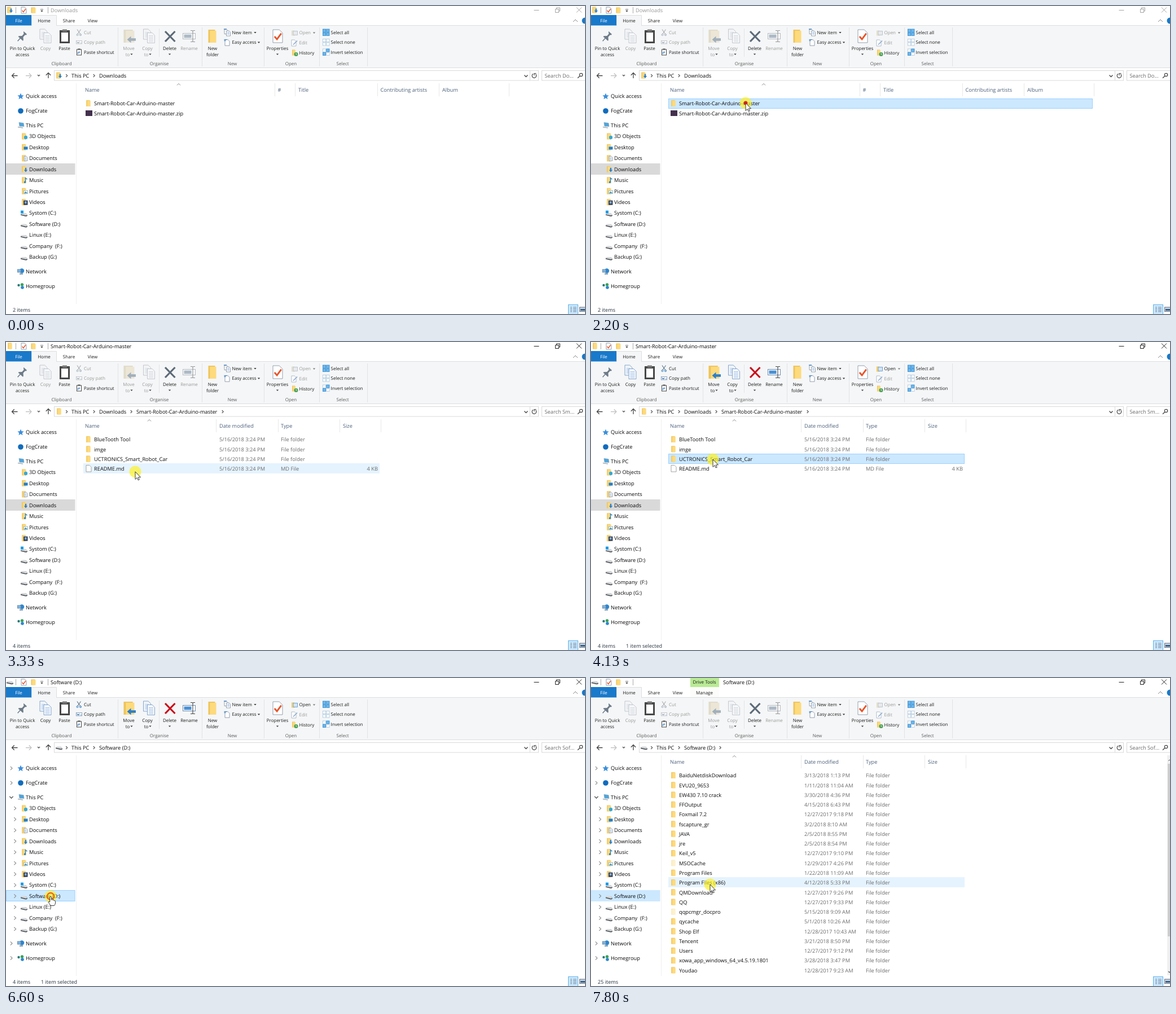
These frames come from a looping animation (1026 by 546 pixels, 8000 ms). An HTML page:

```html
<!DOCTYPE html>
<html lang="en">
<head>
<meta charset="utf-8">
<title>File manager</title>
<style>
  html, body { margin: 0; width: 100%; height: 100%; overflow: hidden; background: #fff; }
  svg { display: block; width: 1026px; height: 546px; }
  text { font: 9.28px "Open Sans", "Noto Sans", sans-serif; fill: #0c0c0c; white-space: pre; text-rendering: geometricPrecision; }
  .s { font-size: 8px; fill: #1c1c1c; }
  .m { text-anchor: middle; }
  .e { text-anchor: end; }
  .group { fill: #5c5c5c; }
  .head { font-size: 9.2px; fill: #4c607a; }
  .dim { fill: #6a6a6a; }
  .status { font-size: 9.1px; fill: #26323f; }
  .gray { fill: #9a9a9a; }
  .white { fill: #fff; }
  .off .lbl { fill: #9a9a9a; }
  .off .ic { filter: grayscale(.7); opacity: .55; }
  .cross { stroke: #c8101c; }
  .off .cross { stroke: #5c6977; }
  .ctl { stroke: #222; }
  .idle .ctl { stroke: #a5a5a5; }
  .idle .title { fill: #999; }
</style>
</head>
<body>
<svg id="stage" viewBox="0 0 1026 546"></svg>
<script>
const LOOP = 8000, TICK = 1000 / 15;
const ROW_TOP = 164, ROW_H = 17.27;

// Drawing helpers
const text = (x, y, s, cls = '') => {
  const small = /\bs\b/.test(cls);
  return `<text x="${x}" y="${y + (small ? 2.9 : 3.3)}" class="${cls}">${s}</text>`;
};
const rect = (x, y, w, h, fill, stroke = 'none', more = '') =>
  `<rect x="${x}" y="${y}" width="${w}" height="${h}" fill="${fill}" stroke="${stroke}" ${more}/>`;
const path = (d, stroke, width = 1, fill = 'none', more = '') =>
  `<path d="${d}" stroke="${stroke}" stroke-width="${width}" fill="${fill}" ${more}/>`;
const dot = (x, y, r, fill) => `<circle cx="${x}" cy="${y}" r="${r}" fill="${fill}"/>`;
const group = (body, attrs = '') => `<g ${attrs}>${body}</g>`;
const at = (x, y, body) => group(body, `transform="translate(${x} ${y})"`);
const vline = (x, y1, y2, color = '#e2e3e4') => path(`M${x} ${y1}V${y2}`, color);
const caret = (x, y, color = '#333') => path(`M${x - 2.2} ${y - 1}h4.4l-2.2 2.4z`, 'none', 0, color);
const chevron = (x, y, color = '#555', r = 2.5) =>
  path(`M${x - r / 2} ${y - r}l${r} ${r}l${-r} ${r}`, color, 1.1);
const up = (x, y, r, color) => path(`M${x - r} ${y + r / 2}l${r} ${-r}l${r} ${r}`, color, 1);
const down = (x, y, r, color) => path(`M${x - r} ${y - r / 2}l${r} ${r}l${r} ${-r}`, color, 1.3);

// Icons, centred on x, y
const folder = (x, y, w = 7.5, h = 11, pale) => at(x - w / 2, y - h / 2,
  rect(0, 0, w * .85, h, pale ? '#f8eabd' : '#eec45a') +
  path(`M${w * .2} ${h * .08}H${w}V${h}H${w * .2}z`, 'none', 0, pale ? '#fdf1cd' : '#fdda7c'));
const page = (x, y, w, h, edge = '#8a97a8', fill = '#fff') =>
  path(`M${x - w / 2} ${y - h / 2}h${w * .66}l${w * .34} ${w * .34}V${y + h / 2}h${-w}z`, edge, .9, fill);
const arrowDown = (x, y) => path(`M${x - 1.2} ${y - 4}h2.4v3.6h2l-3.2 4-3.2-4h2z`, 'none', 0, '#2b7fd0');
const downloads = (x, y) => folder(x - 1, y) + arrowDown(x + 2, y + 1.5);
const drive = (x, y) => at(x, y,
  path('M-6 .5L-3.500-1H3.500L6 2V3.200L4.200 4.300H2.500L-6 2.200z', 'none', 0, '#55595d') +
  path('M-6 .5L-3.500-1.500H3L6 1.800L3.200 2.600z', 'none', 0, '#d6d8da'));
const check = (x, y, k) => path(`M${x - 3 * k} ${y}l${2.3 * k} ${2.6 * k}l${4 * k} ${-5.4 * k}`, '#e8552a', 1.5 * k);
const lines = (x, y, w, n, color) =>
  Array.from({ length: n }, (_, i) => path(`M${x} ${y + i * 2.6}h${w}`, color, .8)).join('');
const pages = (x, y) => page(x - 3.5, y - 3, 13, 18, '#7c9cc4', '#eef4fb') + lines(x - 7, y - 6, 6, 4, '#8fb2dc') +
  page(x + 3.5, y + 3.5, 13, 18, '#7c9cc4', '#f5f9ff') + lines(x - .5, y - .5, 8, 5, '#8fb2dc');
const tiles = (x, y, full) => [0, 1, 2, 3].map(i =>
  rect(x + (i % 2) * 6.3, y + (i >> 1) * 6.3, 5.2, 5.2, full & (1 << i) ? '#6cb9ef' : '#fff',
    full & (1 << i) ? '#2a86cc' : '#a9c6dc', 'stroke-width=".8"')).join('');

function windowFrame() {
  const controls = group(path('M935.500 7.500h9', '') + path('M973.500 5.500h6v6h-6zM975.500 5v-2h6v6h-1.500', '') +
    path('M1011 2.500l9 9M1020 2.500l-9 9', '')).replaceAll('stroke=""', 'class="ctl"');
  return vline(17.5, 2, 13, '#aaa') + page(31.5, 7.5, 9, 11) + check(31.5, 8, 1) + folder(48.5, 7.5, 8, 10) +
    path('M61 6h5', '#333', .8) + caret(63.5, 9) + vline(74.5, 2, 13, '#aaa') + controls +
    rect(0, 34, 1026, 75.5, '#f5f6f7') + path('M0 109.500H1026M89.500 34.500H1026', '#dcdddf') +
    rect(0, 16, 45, 18.5, '#1979ca') + path('M45.500 35V16.500H89.500V35', '#dcdddf', 1, '#f5f6f7') +
    text(22.5, 26, 'File', 's m white') + text(67.5, 26, 'Home', 's m') +
    text(111.5, 26, 'Share', 's m') + text(153.5, 26, 'View', 's m') +
    up(1009, 26, 4, '#888') + dot(1026, 26, 5.5, '#1979ca');
}

function ribbon() {
  const big = (x, l1, l2, cls = '', arrow) => text(x, 75, l1, `s m ${cls}`) +
    (l2 ? text(x - (arrow ? 2 : 0), 86, l2, `s m ${cls}`) : '') + (arrow ? caret(x + (l2 ? 5 : 0), 85.5, '#444') : '');
  const ic = body => group(body, 'class="ic"');
  const pin = at(28, 54, group(path('M-4-9h8v2l-1.500 1v5l4 4v1.500h-11V3l4-4v-5l-1.500-1z', 'none', 0, '#6d7b88') +
    path('M0 4v7', '#6d7b88', 1.5), 'transform="rotate(42)"'));
  const clip = rect(95.5, 43.5, 17, 22, '#4b4b4b', '#3c3c3c') + rect(98, 47, 12, 16, '#fff') + rect(100, 41.5, 8, 4, '#777');
  const cut = path('M126 41.500l5.500 8M132.500 41.500l-5.500 8', '#5e7387', 1.1) +
    path('M125 51a1.500 1.500 0 1 0 3 0a1.500 1.500 0 1 0-3 0M130.500 51a1.500 1.500 0 1 0 3 0a1.500 1.500 0 1 0-3 0', '#2878c0', 1);
  const copyPath = rect(124.5, 61.5, 10, 5.5, '#fff', '#6b8fb5', 'stroke-width=".8"') + path('M126 63l1 3 1-2 1 2 1-3M132 65.500h1.500', '#2d65a0', .8);
  const shortcut = rect(125.5, 77, 8, 10, '#fff', '#444') + rect(127.5, 75.5, 4, 2, '#555') + path('M127.500 85v-3h3m-1.500-1.500l1.800 1.500-1.800 1.500', '#2878c0', 1);
  const moveTo = folder(218, 53.5, 19, 23) + path('M214.500 59.500l7-6v3.700h8.500v4.600h-8.500v3.700z', 'none', 0, '#2a7fcf');
  const rename = rect(313.5, 48.5, 22, 10, '#fff', '#6c8db0') + rect(315.5, 50.5, 13, 6, '#4a90d4') +
    path('M327 43.500h2.500q1.500 0 1.500 1.500v17q0 1.500-1.500 1.500H327M335 43.500h-2.500q-1.500 0-1.500 1.500M335 63.500h-2.500q-1.500 0-1.500-1.500', '#444', 1.1);
  const newItem = page(390, 45.5, 6, 8) + page(394, 48.5, 7, 9) + path('M386 41h5', '#2878c0', 1.2) + lines(392, 47, 4, 2, '#5b93cc');
  const easy = page(392, 65, 8, 10.5) + path('M386.500 59.500h5M386.500 61.500h3', '#2878c0', 1.1);
  const open = folder(509, 48, 6, 9) + rect(509, 44.5, 7.5, 7, '#cfe4f7', '#5b93cc', 'stroke-width=".8"');
  const edit = page(510, 65.5, 8, 11, '#a9b6c6') + path('M509 68.500l7-7', '#8cabd0', 1.6);
  const history = folder(510, 82.5, 6, 10) + dot(514, 85.5, 3.6, '#4fa35a') + path('M514 83.500v2.200h1.600', '#fff', .8);
  return [198.5, 347.5, 457.5, 555.5, 640.5].map(x => vline(x, 38, 107)).join('') + vline(271.5, 40, 90) +
    pin + big(29, 'Pin to Quick', 'access') + ic(pages(70, 53)) + big(70, 'Copy', '', 'lbl') +
    clip + big(103.5, 'Paste', '') +
    ic(cut) + text(138, 47, 'Cut', 's lbl') + ic(copyPath) + text(138, 64.5, 'Copy path', 's lbl') +
    shortcut + text(138, 82, 'Paste shortcut', 's') +
    ic(moveTo) + big(217.5, 'Move', 'to', 'lbl', 1) + ic(pages(253.5, 53)) + big(250.5, 'Copy', 'to', 'lbl', 1) +
    '<path class="cross" d="M282 45l17.500 18M299.500 45l-17.500 18" stroke-width="3.2"/>' + big(290, 'Delete', '', '', 1) +
    ic(rename) + big(324.5, 'Rename', '', 'lbl') + folder(365.5, 53.5, 14, 23) + big(366, 'New', 'folder') +
    newItem + text(400.5, 47, 'New item', 's') + caret(441.5, 47) + easy + text(400.5, 64.5, 'Easy access', 's') + caret(448, 64.5) +
    page(481.5, 53.5, 17, 23) + check(481.5, 54, 1.9) + big(481, 'Properties', '', '', 1) +
    ic(open) + text(519.5, 47.5, 'Open', 's lbl') + caret(546, 47.5, '#777') + edit + text(519.5, 65.5, 'Edit', 's gray') +
    history + text(519.5, 83, 'History', 's') +
    tiles(561.5, 41, 15) + text(575.5, 47, 'Select all', 's') + tiles(561.5, 58.5, 0) + text(575.5, 64.5, 'Select none', 's') +
    tiles(561.5, 76, 6) + text(575.5, 82, 'Invert selection', 's') +
    [[98.5, 'Clipboard'], [271.5, 'Organise'], [401, 'New'], [505, 'Open'], [596.5, 'Select']]
      .map(([x, s]) => text(x, 102, s, 's m group')).join('');
}

function addressBar() {
  const arrow = (x, color) => path(`M${x + 5} 123.500h-10m4.200-4.200l-4.200 4.200 4.200 4.200`, color, 1.3);
  return arrow(15.5, '#444') + group(arrow(0, '#c4c4c4'), 'transform="matrix(-1 0 0 1 40 0)"') + down(58, 123, 2, '#555') +
    path('M75 128v-9.500m-4.200 4.200l4.200-4.200 4.200 4.200', '#444', 1.3) +
    rect(85.5, 114.5, 858, 17.5, '#fff', '#d9d9d9') + down(921.5, 124, 3, '#444') + vline(928.5, 115, 132, '#d9d9d9') +
    path('M934 120.300a3.800 3.800 0 1 0 4.500.4M939.500 119.500h-3.500v3.500', '#444', 1.2) +
    rect(949.5, 114.5, 90, 17.5, '#fff', '#d9d9d9') +
    `<circle cx="1019" cy="122" r="2.7" fill="none" stroke="#444" stroke-width="1.2"/>` + path('M1017 124l-4 3.800', '#444', 1.3);
}

// Navigation pane
const CHILDREN = ['3D Objects', 'Desktop', 'Documents', 'Downloads', 'Music', 'Pictures', 'Videos',
  'Systom (C:)', 'Software (D:)', 'Linux (E:)', 'Company  (F:)', 'Backup (G:)'];
const childY = i => 231 + i * 19.45;
const NAV = [['Quick access', 160], ['FogCrate', 186], ['This PC', 211.5],
  ...CHILDREN.map((s, i) => [s, childY(i), true]), ['Network', 470.5], ['Homegroup', 496.5]];

function navIcon(name, y) {
  const badge = {
    '3D Objects': path(`M32 ${y}l3-1.500 3 1.500v4l-3 1.500-3-1.500z`, 'none', 0, '#35a9d6'),
    'Desktop': rect(31.5, y - 1, 7, 5, '#1f7fd0'),
    'Documents': page(35, y + .5, 6, 8) + lines(33, y - .5, 3.5, 2, '#5b93cc'),
    'Downloads': arrowDown(35, y + 1.5),
    'Music': path(`M34.500 ${y + 3}v-7l3 2.500`, '#1f7fd0', 1.3) + dot(33.5, y + 3.5, 1.7, '#1f7fd0'),
    'Pictures': rect(31.5, y - 1, 7, 5, '#fff', '#9bb') + path(`M32 ${y + 3.5}l2.500-3 4 3z`, 'none', 0, '#3b8bc8'),
    'Videos': rect(31, y - 3, 7.5, 8, '#33415c') + rect(33, y - 1.5, 3.5, 4, '#7fa9d8'),
  }[name];
  if (badge) return folder(32, y) + badge;
  switch (name) {
    case 'Quick access': return path(`M26 ${y - 5.5}l1.600 3.700 4 .3-3 2.700.9 4-3.500-2.100-3.500 2.100.9-4-3-2.700 4-.3z`, 'none', 0, '#3a8fdc');
    case 'FogCrate': return dot(26, y, 4.8, '#0f6cbd');
    case 'This PC': return path(`M23 ${y - 5}l8 1 1 6-8-.5z`, '#8fa7b6', .8, '#4aa5e0') + path(`M21 ${y + 3}l9 1.500`, '#a3adb5', 1.6);
    case 'Network': return dot(28, y - 1, 4.2, '#2d86cf') + rect(20.5, y - 3.5, 6, 5, '#7fb6e0', '#5b7e99', 'stroke-width=".8"') + path(`M24 ${y + 4.5}h6`, '#50708a', 1.4);
    case 'Homegroup': return dot(22.5, y - 1.5, 2.2, '#2a7a78') + dot(28.5, y - 2.5, 2.7, '#3aa35a') + dot(29, y + 2.5, 2.8, '#2d86cf');
  }
  return drive(32, y + 1.5) + (name.endsWith('(C:)') ? rect(26, y - 4.5, 5, 5, '#1c9be6') : '');
}
const nav = NAV.map(([s, y, child]) => navIcon(s, y) + text(child ? 41 : 35, y, s)).join('');
const twisties = NAV.map(([s, y, child]) => s === 'This PC' ? down(9.5, y, 3.2, '#444') : chevron(child ? 16 : 9.5, y, '#8a8a8a', 3.2)).join('');

// File lists
const headers = (cols, seps, sortX) => cols.map(([x, s]) => text(x, 149, s, 'head')).join('') +
  seps.map(x => vline(x, 137, 160, '#e8e8e8')).join('') + up(sortX, 139, 3, '#888');
const detailHeads = () => headers([[140, 'Name'], [378, 'Date modified'], [487, 'Type'], [597, 'Size']], [372.5, 482.5, 591.5, 664.5], 254);
const rowY = i => 173 + i * ROW_H;
const fileRow = ([name, date, kind = 'File folder', size = ''], i) => {
  const y = rowY(i), pale = /^(MSO|qqp)/.test(name);
  return (kind === 'MD File' ? page(146.5, y - .5, 9, 11.5, '#999') : folder(146, y - .5, 7.5, 11, pale)) +
    text(156, y, name) + text(378, y, date, 'dim') + text(487, y, kind, 'dim') + text(659, y, size, 'dim e');
};
const REPO = ['BlueTooth Tool', 'imge', 'UCTRONICS_Smart_Robot_Car'].map(s => [s, '5/16/2018 3:24 PM'])
  .concat([['README.md', '5/16/2018 3:24 PM', 'MD File', '4 KB']]);
const DISK = `BaiduNetdiskDownload|3/13/2018 1:13 PM
EVU20_9653|1/11/2018 11:04 AM
EW430 7.10 crack|3/30/2018 4:36 PM
FFOutput|4/15/2018 6:43 PM
Foxmail 7.2|12/27/2017 9:18 PM
fscapture_gr|3/2/2018 8:10 AM
JAVA|2/5/2018 8:55 PM
jre|2/5/2018 8:54 PM
Keil_v5|12/27/2017 9:10 PM
MSOCache|12/29/2017 4:26 PM
Program Files|1/22/2018 11:09 AM
Program Files (x86)|4/12/2018 5:33 PM
QMDownload|12/27/2017 9:26 PM
QQ|12/27/2017 9:33 PM
qqpcmgr_docpro|5/15/2018 9:09 AM
qycache|5/1/2018 10:26 AM
Shop Elf|12/28/2017 10:43 AM
Tencent|3/21/2018 8:50 PM
Users|12/27/2017 9:12 PM
xowa_app_windows_64_v4.5.19.1801|3/28/2018 3:47 PM
Youdao|12/28/2017 9:23 AM`.split('\n').map(s => s.split('|'));

const REPO_NAME = 'Smart-Robot-Car-Arduino-master';
const zipList = () => headers([[140, 'Name'], [481.5, '#'], [518, 'Title'], [663.5, 'Contributing artists'], [773, 'Album']],
    [476.5, 512.5, 658.5, 767.5, 891.5], 306) +
  folder(146, 172.5) + text(156, 173, REPO_NAME) + rect(141, 185, 12, 10, '#43304d') + text(156, rowY(1), REPO_NAME + '.zip');
const scrollBar = rect(1021, 137, 5, 390, '#f0f0f0') + rect(1022, 152, 4, 306, '#cdcdcd') + up(1025, 146, 2, '#666') + down(1025, 521, 2, '#666');
const driveTab = rect(176, 0, 51, 16, '#b9eb95') + rect(176, 16, 51, 18, '#fcfdfb') +
  text(201, 7.5, 'Drive Tools', 's m') + text(201, 26, 'Manage', 's m');
const crumbs = (...parts) => parts.map(([x, s]) => s === '>' ? chevron(x, 123.5) : text(x, 123.5, s)).join('');
const place = (icon, search, ...parts) => icon(7, 7) + icon(94, 123) + text(954.5, 123.5, search, 'dim') +
  crumbs([107.5, '>'], [116, 'This PC'], [156, '>'], ...parts);

const parts = {
  atDownloads: place(downloads, 'Search Do...', [165, 'Downloads']) + text(79, 7.5, 'Downloads', 'title'),
  atRepo: place(folder, 'Search Sm...', [165, 'Downloads'], [222, '>'], [231, REPO_NAME], [384, '>']) + text(79, 7.5, REPO_NAME, 'title'),
  atDisk: place(drive, 'Search Sof...', [165, 'Software (D:)']),
  titleLeft: text(79, 7.5, 'Software (D:)'),
  diskReady: driveTab + text(234, 7.5, 'Software (D:)') + chevron(229, 123.5) + scrollBar,
  zipList: zipList(),
  repoList: detailHeads() + REPO.map(fileRow).join(''),
  diskList: detailHeads() + DISK.map(fileRow).join(''),
  twisties,
  two: text(12, 539, '2 items', 'status'),
  four: text(12, 539, '4 items', 'status'),
  many: text(12, 539, '25 items', 'status'),
  picked: text(62, 539, '1 item selected', 'status'),
};

const statusIcons = rect(996.5, 529.5, 17, 18, '#cce8ff', '#5fb2e8') + lines(1000, 534, 3, 4, '#567') + lines(1005, 534, 6, 4, '#567') +
  rect(1016.5, 534, 10, 7.5, '#c6d9ea', '#667') + rect(1018, 537, 8, 3, '#3b5f86');
const pointer = path('M0 0V13.500L3.200 10.700 5.200 15 7.300 14.100 5.300 9.900H9.500Z', '#222', .9, '#fff', 'id="arrow"') +
  path('M-1.300 1Q0-.6 1.300 1V6.500Q3-.0 4 7Q6 5.500 6.500 7.600Q8.500 7 8.500 9.500V12Q8 15 6.500 16.500H0Q-2 13-4 10.500Q-4.500 8.500-1.300 10Z', '#222', .9, '#fff', 'id="hand"');

stage.innerHTML = rect(0, 0, 1026, 546, '#fff') + windowFrame() + group(ribbon(), 'id="ribbon"') + addressBar() +
  vline(124.5, 137, 528, '#f0f0f0') + statusIcons +
  ['navSel', 'navHover', 'rowHover', 'rowSel'].map(id => rect(0, 0, 1, 1, 'none', 'none', `id="${id}"`)).join('') + nav +
  Object.entries(parts).map(([id, body]) => group(body, `id="${id}"`)).join('') +
  group('<circle r="10.5" fill="#fff21a" opacity=".68"/><circle id="press" r="3.5" fill="#e02020"/>' +
    '<circle id="ring" fill="none" stroke="#ee5a12" stroke-width="2.4"/>' + pointer, 'id="cursor"');

const $ = id => document.getElementById(id);
const show = (id, on) => $(id).setAttribute('display', on ? 'inline' : 'none');

// Pixel-aligned highlight, with any border kept inside
function box(id, on, x, y, w, h, fill, stroke) {
  show(id, on);
  if (!on) return;
  const inset = stroke ? .5 : 0;
  const attrs = { x: x + inset, y: Math.floor(y) + inset, width: w - 2 * inset, height: h - 2 * inset, fill, stroke: stroke || 'none' };
  Object.entries(attrs).forEach(([k, v]) => $(id).setAttribute(k, v));
}

// Pointer path: time, x, y
const TRACK = [[333, 896, 307], [600, 660, 268], [867, 380, 222], [1133, 263, 203], [1400, 270, 185], [1600, 274, 171],
  [1800, 274, 171], [1867, 274, 172], [2933, 274, 172], [3133, 259, 195], [3333, 229, 230], [3667, 216, 208],
  [4733, 216, 208], [4800, 216, 207], [5200, 216, 207], [5400, 120, 345], [5600, 9.5, 511], [5733, 22, 488],
  [5867, 52, 425], [6067, 79, 387], [6733, 79, 387], [6867, 105, 345], [6933, 126, 295], [7067, 172, 225],
  [7200, 197, 298], [7400, 206, 338], [7600, 210, 358], [7800, 211, 366]];
const CLICKS = [2133, 2400, 3733, 6400];

function pointerAt(t) {
  const i = TRACK.findIndex(p => p[0] > t);
  if (i < 0) return TRACK.at(-1).slice(1);
  const [t0, x0, y0] = TRACK[Math.max(0, i - 1)], [t1, x1, y1] = TRACK[i];
  const k = t1 > t0 ? (t - t0) / (t1 - t0) : 0;
  return [x0 + (x1 - x0) * k, y0 + (y1 - y0) * k];
}

function render(t) {
  const [x, y] = pointerAt(t), visible = t >= 333;
  const inRepo = t >= 2533 && t < 6533, inDisk = t >= 6533, ready = t >= 6733;
  const picked = (t >= 2267 && t < 2533) || (t >= 3733 && !ready);

  stage.classList.toggle('idle', t < 2267);
  $('ribbon').classList.toggle('off', !((t >= 2267 && t < 2533) || (t >= 3867 && !ready)));
  const on = {
    atDownloads: t < 2533, atRepo: inRepo, atDisk: inDisk, titleLeft: inDisk && !ready, diskReady: ready,
    zipList: t < 2533, repoList: inRepo && t >= 2600, diskList: ready, twisties: t >= 5400,
    two: t < 2533, four: t >= 2533 && !ready, many: ready, picked,
  };
  for (const id in on) show(id, on[id]);

  const count = on.zipList ? 2 : on.repoList ? REPO.length : ready ? DISK.length : 0;
  const width = on.zipList ? 752 : 525;
  const row = Math.floor((y - ROW_TOP) / ROW_H);
  const rowBox = (id, show, i, ...paint) => box(id, show, 137, ROW_TOP + i * ROW_H, width, 18, ...paint);
  rowBox('rowHover', visible && x > 137 && x < 137 + width && row >= 0 && row < count, row, '#e5f3ff');
  const chosen = t >= 2133 && t < 2533 ? 0 : t >= 3733 && inRepo ? 2 : -1;
  rowBox('rowSel', chosen >= 0, chosen, '#cce8ff', '#99d1ff');

  const item = x < 122 ? NAV.find(n => Math.abs(n[1] - y) < 9.72) : null;
  const navBox = (id, show, cy, ...paint) => box(id, show, 0, cy - 10, 122.5, 20, ...paint);
  navBox('navSel', true, childY(inDisk ? 8 : 3), inDisk ? '#cce8ff' : '#d9d9d9', inDisk && !ready && '#99d1ff');
  navBox('navHover', item && !(inDisk && item[0] === CHILDREN[8]), item ? item[1] : 0, '#e5f3ff');

  show('cursor', visible);
  $('cursor').setAttribute('transform', `translate(${x.toFixed(1)} ${y.toFixed(1)})`);
  show('hand', item);
  show('arrow', !item);
  const age = t - (CLICKS.findLast(c => c <= t) ?? -LOOP);
  const spread = (age - 133) / 267;
  show('press', age < 133);
  show('ring', spread >= 0 && spread < 1);
  $('ring').setAttribute('r', Math.max(0, 4 + 8 * spread).toFixed(2));
  $('ring').setAttribute('opacity', Math.max(0, Math.min(1, 1.25 * (1 - spread))).toFixed(2));
}

const start = performance.now();
function frame() {
  const t = (performance.now() - start) % LOOP;
  render(Math.ceil(Math.floor(t / TICK + .06) * TICK));
  requestAnimationFrame(frame);
}
frame();
</script>
</body>
</html>
```
